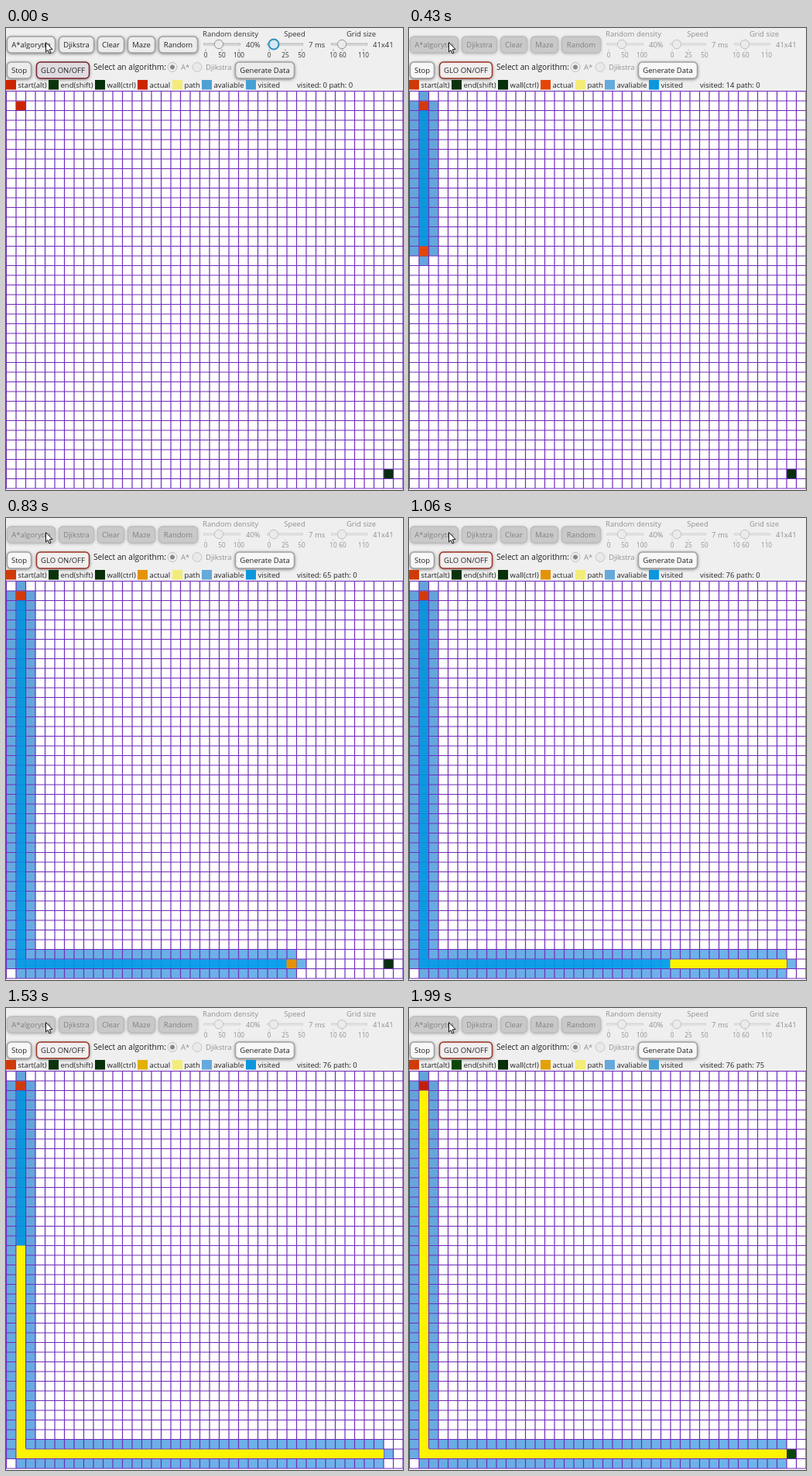
Write an HTML page with a canvas that moves like this. It is 513 px wide and 596 px high and loops after 2040 ms.

```html
<!DOCTYPE html>
<html lang="en">
<head>
<meta charset="utf-8">
<title>Pathfinding grid</title>
<style>
  html, body { margin: 0; width: 100%; height: 100%; overflow: hidden; background: #fff; }
  canvas { display: block; }
</style>
</head>
<body>
<canvas id="stage" width="513" height="596"></canvas>
<script>
const ctx = document.getElementById('stage').getContext('2d');
const LOOP = 2040, CELL = 12.5, TOP = 81.5, SIZE = 41, LAST = 75;
// Moments at which the screen refreshes
const TICKS = [0, 70, 310, 370, 430, 460, 520, 580, 630, 680, 730, 780, 830,
  890, 960, 1020, 1090, 1150, 1220, 1280, 1340, 1420, 1480, 1530, 1580, 1670, 1770, 1860, 1960, 1990];
const SEARCH = [[305, 0], [430, 14.8], [630, 41.1], [830, 65.7], [907, 76]];
const TRACE = [[889, 0], [1280, 36.1], [1530, 59.1], [1705, LAST]];
const HUE = [[310, 12], [430, 17], [630, 32], [830, 38], [1280, 38], [1530, 46], [1990, 42]];

function interpolate(keys, t) {
  if (t <= keys[0][0]) return keys[0][1];
  for (let i = 1; i < keys.length; i++) {
    const [t0, v0] = keys[i - 1], [t1, v1] = keys[i];
    if (t < t1) return v0 + (v1 - v0) * (t - t0) / (t1 - t0);
  }
  return keys[keys.length - 1][1];
}

function text(str, x, y, color = '#222', size = 9.5, align = 'left') {
  ctx.font = `${size}px "Open Sans", "Noto Sans", sans-serif`;
  ctx.textAlign = align;
  ctx.fillStyle = color;
  ctx.fillText(str, x, y);
}

function rect(x, y, w, h, color) {
  ctx.fillStyle = color;
  ctx.fillRect(x, y, w, h);
}

function button(label, x, y, w, { off = false, fill = '#ececec', border = '#a2a2a2' } = {}) {
  ctx.save();
  ctx.shadowColor = off ? 'rgba(0,0,0,.3)' : 'rgba(0,0,0,.6)';
  ctx.shadowBlur = 4;
  ctx.shadowOffsetY = 1;
  ctx.beginPath();
  ctx.roundRect(x + 1.5, y + 1, w - 3, 21, 5);
  ctx.fillStyle = off ? '#c9c9c9' : fill;
  ctx.fill();
  ctx.restore();
  ctx.strokeStyle = off ? '#bdbdbd' : border;
  ctx.lineWidth = 1.5;
  ctx.stroke();
  text(label, x + w / 2, y + 15, off ? '#808080' : '#222', 9.5, 'center');
}

function disc(x, y, r, fill, stroke, width = 1) {
  ctx.beginPath();
  ctx.arc(x, y, r, 0, Math.PI * 2);
  ctx.fillStyle = fill;
  ctx.fill();
  ctx.strokeStyle = stroke;
  ctx.lineWidth = width;
  ctx.stroke();
}

function slider(label, labelX, x, w, thumb, value, valueX, marks, off, focused) {
  const color = off ? '#909090' : '#333';
  text(label, labelX, 11, color, 9.5, 'center');
  rect(x, 19.5, w, 3, off ? '#d2d2d2' : '#b4b4b4');
  rect(x + 1, 20.5, w - 2, 1.5, off ? '#e4e4e4' : '#dcdcdc');
  for (const [mark, markX] of marks) {
    rect(markX - .5, 27, 1, 3, off ? '#cfcfcf' : '#a8a8a8');
    text(mark, markX, 38, color, 8.2, 'center');
  }
  if (focused) disc(thumb, 21, 6.5, '#d6e9f2', '#2f8fbe', 2);
  else disc(thumb, 21, 5.7, '#ebebeb', off ? '#c2c2c2' : '#979797');
  text(value, valueX, 25, color);
}

function cursor() {
  ctx.beginPath();
  ctx.moveTo(51.5, 18.5);
  for (const [x, y] of [[51.5, 31], [54.2, 28.4], [56, 32.8], [58, 32], [56.2, 27.8], [60, 27.5]]) ctx.lineTo(x, y);
  ctx.closePath();
  ctx.fillStyle = '#fff';
  ctx.fill();
  ctx.strokeStyle = '#111';
  ctx.lineWidth = 1;
  ctx.stroke();
}

const available = i => `hsl(207 ${62 + 14 * i / LAST}% ${62 + 6 * i / LAST}%)`;
const visited = i => `hsl(200 100% ${43 + 4 * i / LAST}%)`;
// The route runs down the second column, then right along the last row but one
const routeCell = i => i <= 38 ? [1, 1 + i] : [i - 37, 39];

function cell(col, row, color) {
  rect(col * CELL + .5, TOP + row * CELL, CELL, CELL, color);
}

// Covers the grid lines that cross the direction of travel
function routeFill(i, color) {
  const [col, row] = routeCell(i), x = col * CELL + .5, y = TOP + row * CELL;
  if (i < 38) rect(x + .5, y, CELL - 1, CELL + .5, color);
  else if (i > 38) rect(x - .5, y + .5, CELL + .5, CELL - 1, color);
  else rect(x + .5, y - .5, CELL, CELL, color);
}

function gridLines() {
  ctx.beginPath();
  for (let i = 0; i <= SIZE; i++) {
    const p = i * CELL;
    ctx.moveTo(p + .5, TOP);
    ctx.lineTo(p + .5, TOP + SIZE * CELL);
    ctx.moveTo(0, TOP + p);
    ctx.lineTo(513, TOP + p);
  }
  ctx.strokeStyle = '#702cba';
  ctx.lineWidth = 1.2;
  ctx.stroke();
}

function drawGrid(t, actual) {
  const progress = interpolate(SEARCH, t);
  const head = t < 310 ? -1 : Math.min(LAST, Math.round(progress));
  const traced = Math.floor(interpolate(TRACE, t));
  const done = t >= 1960;
  rect(0, 81, 513, 515, '#fff');
  cell(39, 39, done ? '#0b4808' : '#082f0a');
  for (let i = 0; i <= head; i++) {
    const [c, r] = routeCell(i);
    for (const [dx, dy] of [[-1, 0], [1, 0], [0, -1], [0, 1]]) {
      if (!(done && c + dx === 39)) cell(c + dx, r + dy, available(i));
    }
  }
  gridLines();
  for (let i = 1; i <= head; i++) {
    if (i > LAST - traced) continue;
    ctx.globalAlpha = .86;
    routeFill(i, visited(i));
    ctx.globalAlpha = 1;
  }
  for (let i = LAST; i > LAST - traced; i--) routeFill(i, '#fcf400');
  if (head > 0 && !traced) routeFill(head, actual);
  rect(13, 94.5, 12, 11.5, t < 310 ? '#cb2500' : done ? '#c02008' : '#d23a0c');
}

function drawToolbar(t, actual) {
  const off = t >= 310;
  rect(0, 0, 513, 81, '#efefef');
  for (const [label, x, w] of [['A*algorytm', 0, 65], ['Djikstra', 67, 48], ['Clear', 117, 37],
    ['Maze', 156, 38], ['Random', 196, 53]]) button(label, x, 10, w, { off });
  button('Stop', 0, 43, 34, { fill: off ? '#f7f7f7' : '#ececec' });
  button('GLO ON/OFF', 38, 43, 71, { fill: off ? '#f1eeee' : '#dfdce1', border: off ? '#a03424' : '#7c2630' });
  button('Generate Data', 295, 43, 79, { fill: off ? '#f7f7f7' : '#ececec' });

  slider('Random density', 290, 255, 48, 275, '40%', 310, [['0', 258], ['50', 279], ['100', 301]], off);
  slider('Speed', 373, 337, 47, 346, '7 ms', 391, [['0', 340], ['25', 361], ['50', 382]], off, t < 70);
  slider('Grid size', 459, 420, 47, 434, '41x41', 474, [['10', 423], ['60', 435], ['110', 462]], off);

  text('Select an algorithm:', 113, 54, '#222', 10.2);
  disc(215, 50.5, 6, '#f0f0f0', '#bdbdbd');
  disc(215, 50.5, 2.8, '#888', '#888', .5);
  text('A*', 226, 54, '#909090');
  disc(247, 50.5, 6, '#e9e9e9', '#c8c8c8');
  text('Djikstra', 258, 54, '#909090');

  const legend = [
    ['start(alt)', 0, off ? '#d03a08' : '#cb2500'],
    ['end(shift)', 55, t >= 1960 ? '#0b4808' : '#0b340c'],
    ['wall(ctrl)', 115, '#08300a'],
    ['actual', 170, actual],
    ['path', 215, '#f4ec78'],
    ['avaliable', 253, off ? '#66a9dc' : '#4fa1d2'],
    ['visited', 310, off && t < 1960 ? '#0c96de' : '#469fd4'],
  ];
  for (const [label, x, color] of legend) {
    rect(x, 67, 13, 12.5, color);
    text(label, x + 15.5, 77);
  }
  const count = off ? Math.floor(interpolate(SEARCH, t)) : 0;
  text(`visited: ${count} path: ${t >= 1960 ? LAST : 0}`, 376, 77);
  cursor();
}

const begin = performance.now();
function frame() {
  const now = (performance.now() - begin) % LOOP;
  const t = TICKS.findLast(tick => tick <= now);
  const actual = t < 310 ? '#cb2500' : `hsl(${interpolate(HUE, t)} 94% 46%)`;
  drawGrid(t, actual);
  drawToolbar(t, actual);
  requestAnimationFrame(frame);
}
frame();
</script>
</body>
</html>
```
